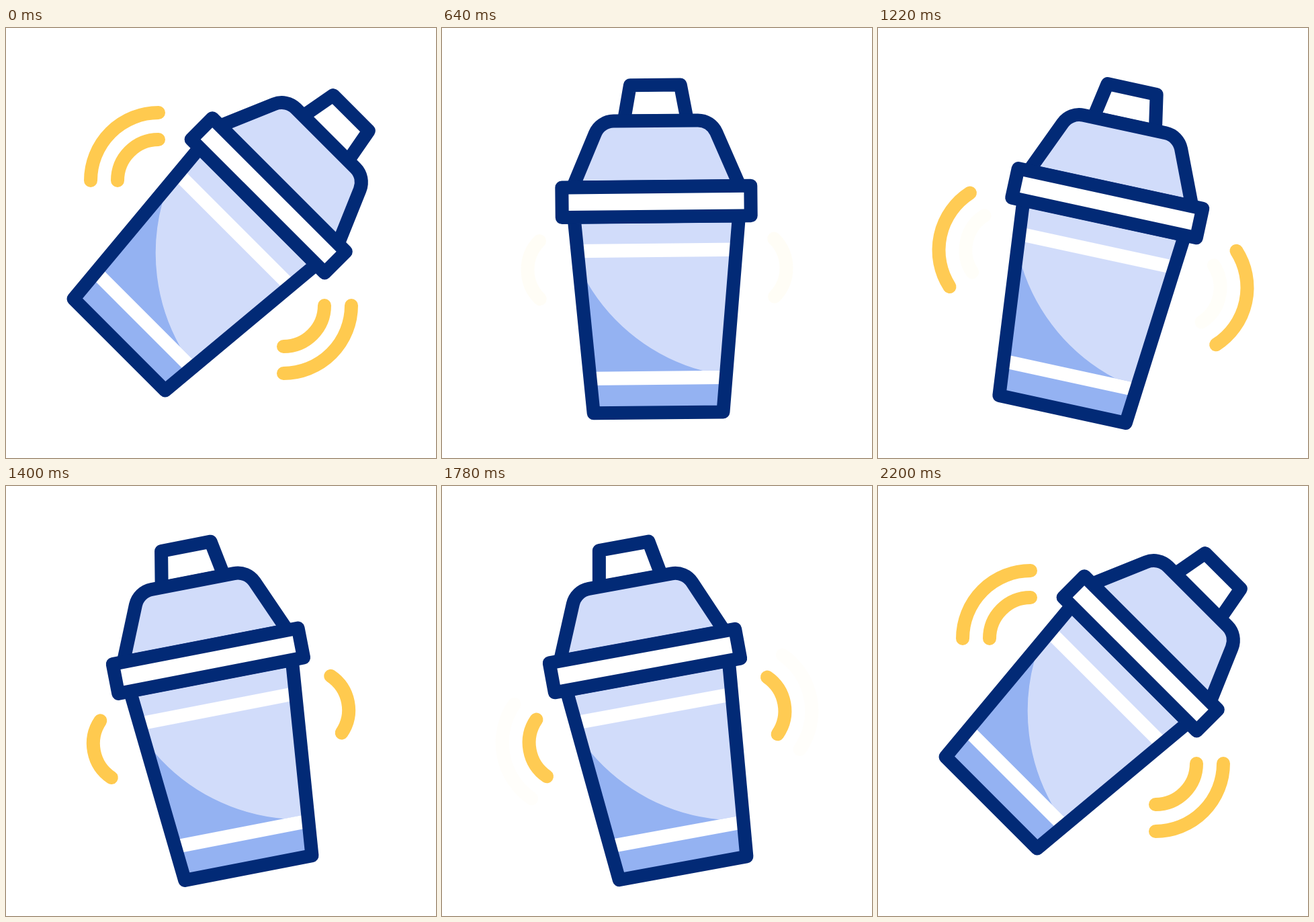
An HTML page with a canvas that plays this animation: 640 px wide and 640 px high, repeating every 2400 ms.

```html
<!DOCTYPE html>
<html lang="en">
<head>
<meta charset="utf-8">
<title>Shaker</title>
<style>
  html, body { margin: 0; width: 100%; height: 100%; overflow: hidden; background: #fff; }
  canvas { display: block; width: 100vw; height: 100vh; }
</style>
</head>
<body>
<canvas id="stage" width="640" height="640"></canvas>
<script>
  const LOOP = 2400;
  const NAVY = '#022a76', LIGHT = '#d1dcfa', MID = '#94b2f2', YELLOW = '#ffca4f', WHITE = '#fff';
  const ctx = document.getElementById('stage').getContext('2d');

  // Motion: stand up, swing left and right, lie back
  const rest = { angle: 45, drop: 0, inner: 1, outer: 1 };
  const upright = { angle: 0, drop: 38.4, inner: 0, outer: 0 };
  const left = { ...upright, angle: -11, inner: 1 };
  const right = { ...upright, angle: 13, outer: 1 };

  const keys = [];
  const key = (time, pose) => keys.push({ time, pose });
  key(0, rest);
  key(200, rest);
  key(600, upright);
  key(900, left);
  for (let time = 1200; time <= 1800; time += 200) key(time, time % 400 ? left : right);
  key(2200, rest);
  key(LOOP, rest);

  const smooth = s => s * s * (3 - 2 * s);

  function poseAt(time) {
    const i = keys.findIndex(k => k.time > time);
    const from = keys[i - 1], to = keys[i];
    const p = smooth((time - from.time) / (to.time - from.time));
    const mix = name => from.pose[name] + (to.pose[name] - from.pose[name]) * p;
    return { angle: mix('angle'), drop: mix('drop'), inner: mix('inner'), outer: mix('outer') };
  }

  // Shapes: the cup is symmetric around x = 0
  function trapezoid(topHalf, top, bottomHalf, bottom, radius = 0) {
    const path = new Path2D();
    path.moveTo(-bottomHalf, bottom);
    path.arcTo(-topHalf, top, topHalf, top, radius);
    path.arcTo(topHalf, top, bottomHalf, bottom, radius);
    path.lineTo(bottomHalf, bottom);
    path.closePath();
    return path;
  }

  const body = trapezoid(122.8, -78, 96.4, 214);
  const lid = trapezoid(82.4, -220.4, 124.4, -122, 30);
  const cap = trapezoid(37.4, -273.6, 47.2, -220);
  const rim = trapezoid(140.5, -122.3, 140.5, -77.7);
  const shade = new Path2D('M-104 19.5A285 285 0 0 0 66.5 152.3H130V230H-140V19.5Z');

  function paint(path, fill) {
    ctx.fillStyle = fill;
    ctx.fill(path);
  }

  function outline(path) {
    ctx.strokeStyle = NAVY;
    ctx.stroke(path);
  }

  function wave(radius, opacity) {
    ctx.globalAlpha = opacity;
    ctx.strokeStyle = YELLOW;
    for (const side of [-1, 1]) {
      const middle = side < 0 ? Math.PI : 0;
      ctx.beginPath();
      ctx.arc(side * 131.5, 0, radius, middle - Math.PI / 4, middle + Math.PI / 4);
      ctx.stroke();
    }
    ctx.globalAlpha = 1;
  }

  function drawBody() {
    ctx.save();
    ctx.clip(body);
    paint(body, LIGHT);
    paint(shade, MID);
    ctx.fillStyle = WHITE;
    for (const y of [-37.7, 152.3]) ctx.fillRect(-140, y, 280, 20.3);
    ctx.restore();
    outline(body);
  }

  function draw(now) {
    const { angle, drop, inner, outer } = poseAt(now % LOOP);
    ctx.resetTransform();
    ctx.fillStyle = WHITE;
    ctx.fillRect(0, 0, 640, 640);
    ctx.translate(320, 320 + drop);
    ctx.rotate(angle * Math.PI / 180);
    ctx.lineWidth = 20;
    ctx.lineCap = ctx.lineJoin = 'round';

    wave(61, inner);
    wave(101, outer);
    drawBody();
    for (const [path, fill] of [[cap, WHITE], [lid, LIGHT], [rim, WHITE]]) {
      paint(path, fill);
      outline(path);
    }
  }

  function tick() {
    draw(performance.now());
    requestAnimationFrame(tick);
  }
  tick();
</script>
</body>
</html>
```
